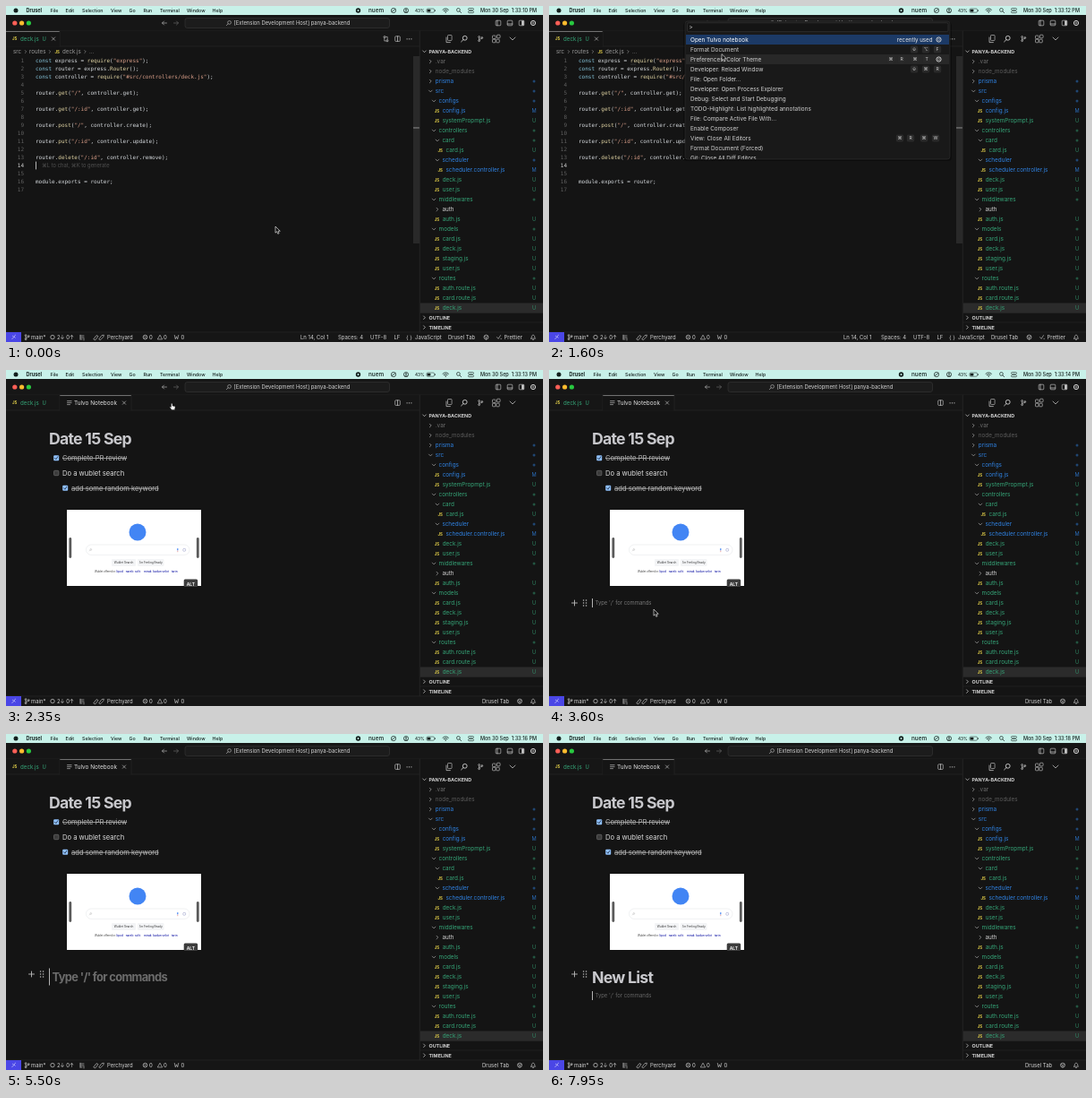
Write an HTML page that moves like this. It is 600x375 px and loops after 8000 ms.

```html
<!DOCTYPE html>
<html lang="en">
<head>
<meta charset="utf-8">
<title>Notebook in the editor</title>
<style>
html, body { margin: 0; width: 100%; height: 100%; overflow: hidden; background: #141414; }
svg { display: block; width: 100vw; height: 100vh; }
text { font-family: Inter, "DejaVu Sans", sans-serif; white-space: pre; }
.mono { font-family: "DejaVu Sans Mono", monospace; }
</style>
</head>
<body>
<svg id="stage" viewBox="0 0 600 375" xmlns="http://www.w3.org/2000/svg"></svg>
<script>
const LOOP = 8000;
const GREEN = '#35a578', BLUE = '#2f83e4', LIGHT = '#d2d2d2', DIM = '#6e6e6e', YELLOW = '#e6d24a';
const stage = document.getElementById('stage');

// y is the visual middle of the line
const text = (x, y, s, size = 6.35, fill = LIGHT, more = '') =>
  `<text x="${x}" y="${(y + size * .36).toFixed(2)}" font-size="${size}" fill="${fill}" ${more}>${s}</text>`;
const rect = (x, y, w, h, fill, more = '') =>
  `<rect x="${x}" y="${y}" width="${w}" height="${h}" fill="${fill}" ${more}/>`;
const dot = (x, y, r, fill, more = '') => `<circle cx="${x}" cy="${y}" r="${r}" fill="${fill}" ${more}/>`;
const line = (d, stroke = LIGHT, width = .7) =>
  `<path d="${d}" fill="none" stroke="${stroke}" stroke-width="${width}" stroke-linecap="round" stroke-linejoin="round"/>`;
const ring = (x, y, r, stroke = LIGHT, width = .7) => dot(x, y, r, 'none', `stroke="${stroke}" stroke-width="${width}"`);
const frame = (x, y, w, h, stroke = LIGHT, width = .6, r = .8) =>
  rect(x, y, w, h, 'none', `rx="${r}" stroke="${stroke}" stroke-width="${width}"`);
const chevron = (x, y, open, color = LIGHT, r = 1.8) => open
  ? line(`M${x - r} ${y - r / 2}l${r} ${r} ${r} ${-r}`, color)
  : line(`M${x - r / 2} ${y - r}l${r} ${r} ${-r} ${r}`, color);
const glass = (x, y, color = LIGHT, r = 1.9) =>
  ring(x + r * .3, y - r * .3, r, color, r * .37) + line(`M${x - r * .4} ${y + r * .4}l${-r} ${r}`, color, r * .37);
const cross = (x, y, color = LIGHT) => line(`M${x - 1.7} ${y - 1.7}l3.4 3.4m0 -3.4l-3.4 3.4`, color, .6);
const gear = (x, y, color = LIGHT) => ring(x, y, 2.6, color, 1) + ring(x, y, 1, color, .6);
const ellipsis = (x, y) => [-2.4, 0, 2.4].map(d => dot(x + d, y, .6, LIGHT)).join('');
const jsIcon = (x, y) => text(x, y, 'JS', 4.3, YELLOW, 'font-weight="700"');
const split = (x, y) => frame(x - 2.8, y - 2.8, 5.6, 5.6) + line(`M${x} ${y - 2.8}v5.6`);
const branch = (x, y) => ring(x - 1.4, y - 2, .9) + ring(x - 1.4, y + 2.2, .9) + ring(x + 1.8, y - 1, .9) +
  line(`M${x - 1.4} ${y - 1}v2.2m0 -.4q3 0 3.2 -1.6`, LIGHT, .6);
const group = (id, body) => `<g id="${id}">${body}</g>`;

function menuBar() {
  const ink = '#14201e', paper = '#c8f1e9', bold = 'font-weight="500"';
  const menus = [[49.5, 'File'], [66.5, 'Edit'], [85, 'Selection'], [117, 'View'], [137.5, 'Go'],
    [153.5, 'Run'], [172, 'Terminal'], [202, 'Window'], [230.5, 'Help']];
  return rect(0, 0, 600, 10, paper) + dot(11, 5, 2.5, ink) +
    text(22.5, 5, 'Drusel', 5.5, ink, 'font-weight="700"') +
    menus.map(([x, s]) => text(x, 5, s, 5.3, ink, bold)).join('') +
    dot(393.5, 5, 2.7, ink) + dot(393.5, 5, 1, paper) +
    text(405, 5, 'nuem', 6.4, ink, bold) +
    ring(433, 5, 2.6, ink) + line('M431 6.5l4 -3', ink) + ring(447, 5, 2.6, ink) + dot(447, 4.3, .9, ink) +
    line('M445.4 6.8q1.6 -1.6 3.2 0', ink) + text(457, 5, '43%', 4.6, ink, bold) +
    frame(470, 3, 8.5, 4.2, ink, .5, 1.2) + rect(470.7, 3.7, 3.6, 2.8, ink, 'rx=".6"') + rect(479, 4.3, .7, 1.6, ink) +
    line('M488 4.2q3.2 -2.8 6.4 0m-5.2 1.3q2 -1.6 4 0', ink, .8) + dot(491.2, 7, .7, ink) +
    `<g transform="translate(1011.5 0) scale(-1 1)">${glass(505.5, 5, ink)}</g>` +
    frame(516.5, 2.5, 6, 2, ink, .6, 1) + frame(516.5, 5.7, 6, 2, ink, .6, 1) +
    `<text id="clock" x="530" y="7" font-size="5.5" fill="${ink}" font-weight="500"></text>`;
}

function titleBar() {
  const lights = ['#ff5f57', '#febc2e', '#28c840'];
  return rect(0, 10, 600, 18, '#161616') + lights.map((c, i) => dot(9.8 + i * 7.8, 19, 2.6, c)).join('') +
    line('M179.5 19h-5m2 -2l-2 2 2 2', '#b0b0b0') + line('M187.5 19h5m-2 -2l2 2 -2 2', '#666') +
    rect(200, 13.5, 228.5, 11, '#1c1c1c', 'rx="2.5" stroke="#383838" stroke-width=".6"') + glass(249, 19, '#aaa') +
    text(254.5, 19, '[Extension Development Host] panya-backend', 5.9) +
    [550, 563, 576].map(x => frame(x - 2.8, 16.2, 5.6, 5.6)).join('') +
    line('M549 16.2v5.6') + line('M560.2 20h5.6') + rect(576.2, 16.4, 2.4, 5.2, LIGHT) + gear(589, 19) +
    line('M0 28H600', '#292929', .6);
}

function sidebar() {
  // depth, kind (> closed, v open, j script), name, colour, mark
  const rows = [
    [0, '>', '.var', DIM], [0, '>', 'node_modules', '#5c5c5c'], [0, '>', 'prisma', BLUE, 'o'], [0, 'v', 'src', BLUE, 'o'],
    [1, 'v', 'configs', BLUE, 'o'], [1, 'j', 'config.js', BLUE, 'M'], [1, 'j', 'systemPropmpt.js', GREEN, 'U'],
    [1, 'v', 'controllers', GREEN, 'o'], [2, 'v', 'card', GREEN, 'o'], [2, 'j', 'card.js', GREEN, 'U'],
    [2, 'v', 'scheduler', BLUE, 'o'], [2, 'j', 'scheduler.controller.js', BLUE, 'M'],
    [1, 'j', 'deck.js', GREEN, 'U'], [1, 'j', 'user.js', GREEN, 'U'], [1, 'v', 'middlewares', GREEN, 'o'],
    [2, '>', 'auth', LIGHT], [1, 'j', 'auth.js', GREEN, 'U'], [1, 'v', 'models', GREEN, 'o'],
    [1, 'j', 'card.js', GREEN, 'U'], [1, 'j', 'deck.js', GREEN, 'U'], [1, 'j', 'staging.js', GREEN, 'U'],
    [1, 'j', 'user.js', GREEN, 'U'], [1, 'v', 'routes', GREEN, 'o'], [1, 'j', 'auth.route.js', GREEN, 'U'],
    [1, 'j', 'card.route.js', GREEN, 'U'], [1, 'j', 'deck.js', GREEN, 'U']];
  const row = ([depth, kind, name, color, mark], i) => {
    const y = 62 + i * 11, x = 474.3 + depth * 3.8, js = kind === 'j';
    const sign = mark === 'o' ? dot(590, y, 1.5, color, 'opacity=".45"')
      : mark ? text(590, y, mark, 5.7, color, 'text-anchor="middle" opacity=".8"') : '';
    return (js ? jsIcon(x + .7, y + .3) : chevron(x, y, kind === 'v', '#aaa')) +
      text(x + (js ? 9.6 : 5.5), y, name, 6.35, color) + sign;
  };
  const section = (y, s, open) => chevron(467.5, y, open) + text(472.5, y, s, 5.4, LIGHT, 'font-weight="700"');
  return rect(462, 28, 138, 336, '#141414') + line('M462.3 28V364', '#2b2b2b', .7) +
    frame(493.5, 32.5, 4.6, 6) + line('M492 35v5.6h4.4') + glass(512, 36.5, LIGHT, 2.4) + branch(530, 36.5) +
    [[543.5, 33], [543.5, 37.2], [547.7, 37.2], [548.5, 32.2]].map(([x, y]) => frame(x, y, 3.6, 3.6)).join('') +
    chevron(566, 36.5, true, LIGHT, 3) + section(50.8, 'PANYA-BACKEND', true) +
    rect(463, 331.5, 137, 11, '#2b2b2b') + rows.map(row).join('') +
    line('M463 342.5H600M463 353H600', '#2b2b2b', .5) + section(347.8, 'OUTLINE') + section(358.6, 'TIMELINE');
}

function statusBar() {
  const y = 369.6, s = 5.95;
  const put = (x, label) => text(x, y, label, s);
  const cube = x => ring(x, y, 2.4) + line(`M${x - 2} ${y - 1}l2 1.2 2 -1.2m-2 1.2v2.4`, LIGHT, .5);
  const bell = line(`M586.5 ${y + 1.6}h5l-.8 -1.2v-1.6q-1.7 -3 -3.4 0v1.6zm2 1.3h1`, LIGHT, .6);
  return rect(0, 364, 600, 11, '#161616') + line('M0 364H600', '#2b2b2b', .6) + rect(0, 364, 17, 11, '#4a46e6') +
    line(`M6.8 ${y + 2}l2 -2 -1.4 -1.4M10.6 ${y - 2.4}l-1.8 1.6 1.4 1.4`, '#e8e8ff', .6) +
    branch(23.5, y) + put(28, 'main*') + ring(52, y, 2.2) + put(57, '2↓ 0↑') +
    line(`M83 ${y - 2.4}v4.8m0 -4h4m-4 2h4m-4 2h2m2 -1v2`, LIGHT, .6) +
    line(`M98 ${y + 2}l3 -4 2 1 -3 4zM104 ${y + 2}l3 -4 2.4 -.4 -.6 2.2 -3 3z`, LIGHT, .6) + put(113, 'Perchyard') +
    ring(155.5, y, 2.3) + line(`M154.6 ${y - .9}l1.8 1.8m0 -1.8l-1.8 1.8`, LIGHT, .5) + put(160, '0') +
    line(`M169.5 ${y + 2}l2.5 -4.4 2.5 4.4z`, LIGHT, .6) + put(176, '0') +
    line(`M188.3 ${y - 2.2}l1 4.4 1.2 -3 1.2 3 1 -4.4`, LIGHT, .6) + put(195.5, '0') +
    group('codeStatus', put(329, 'Ln 14, Col 1') + put(371, 'Spaces: 4') + put(407, 'UTF-8') + put(433.5, 'LF') +
      put(447, '{ }') + put(457, 'JavaScript') + put(494, 'Drusel Tab') + cube(536.5) +
      line(`M548.5 ${y}l1.6 1.8 2.4 -3.8m1 3.8l-.6 0`, LIGHT, .6) + put(556.5, 'Prettier')) +
    group('noteStatus', put(532, 'Drusel Tab') + cube(574)) + bell;
}

function codeView() {
  const source = ['const express = require("express");', 'const router = express.Router();',
    'const controller = require("#src/controllers/deck.js");', '', 'router.get("/", controller.get);', '',
    'router.get("/:id", controller.get);', '', 'router.post("/", controller.create);', '',
    'router.put("/:id", controller.update);', '', 'router.delete("/:id", controller.remove);', '', '',
    'module.exports = router;', ''];
  const paint = (s, c) => `<tspan fill="${c}">${s}</tspan>`;
  const color = s => s.replace(/"[^"]*"|\bconst\b|\w+(?=\()/g,
    m => paint(m, m[0] === '"' ? '#dca08a' : m === 'const' ? '#86c5dc' : '#e3d6a5'));
  const y = i => 61 + i * 9;
  return rect(0, 45, 462, 319, '#141414') +
    text(8, 51, 'src', 6.2, '#999') + chevron(22, 51, false, '#888', 1.5) + text(26, 51, 'routes', 6.2, '#999') +
    chevron(49, 51, false, '#888', 1.5) + jsIcon(54.5, 51.3) + text(63, 51, 'deck.js', 6.2, '#999') +
    chevron(88.5, 51, false, '#888', 1.5) + text(93, 51, '...', 6.2, '#999') +
    source.map((s, i) => text(20, y(i), i + 1, 6, i === 13 ? LIGHT : '#606060', 'class="mono" text-anchor="end"') +
      text(33, y(i), color(s), 6, '#d8dce0', 'class="mono"')).join('') +
    [92, 94, 96].map(x => dot(x, 65, .4, '#999')).join('') +
    rect(455, 56, 7, 209, '#292929') + rect(455, 135.3, 7, 1.3, '#777') +
    group('ghost', text(40, 178, '⌘L to chat, ⌘K to generate', 5.8, '#505050') +
      rect(33, 173.6, .8, 8.8, '#ddd', 'id="codeCaret"'));
}

function tabs() {
  const active = (x, w) => rect(x, 28, w, 17.4, '#151515') + rect(x, 28, w, .7, '#9a9a9a');
  return rect(0, 28, 462, 17, '#161616') + line('M0 45H462M60 28V45', '#2a2a2a', .6) +
    group('codeTab', active(0, 59.7) + cross(53, 36.6) + ring(423, 34.6, 1) + ring(426, 38.8, 1) +
      line('M422.8 36v3h1.6M426.2 37.4v-3h-1.6', LIGHT, .6)) +
    jsIcon(7, 36.8) + text(16, 36.6, 'deck.js', 6.2, GREEN) + text(40.5, 36.6, 'U', 5.8, GREEN) +
    group('noteTab', active(60.3, 79.7) + line('M140 28V45', '#2a2a2a', .6) +
      line('M68.5 34.6h4.6m-4.6 2h4.6m-4.6 2h3', LIGHT, .6) + text(76, 36.6, 'Tulvo Notebook', 6.45, '#e0e0e0') +
      cross(132, 36.6)) + split(437.5, 36.6) + ellipsis(450.5, 36.8);
}

function picture() {
  const ink = '#333', tongues = ['lipod', 'nareb', 'solti', 'mirak', 'kadun', 'velot', 'tarin'];
  const handle = x => rect(x, 187, 2.8, 23, '#5a5a5a', 'rx="1.4"');
  return rect(68, 156, 150, 85, '#fff') + dot(147, 181, 9.5, '#4285f4') +
    frame(89.5, 195, 115.5, 11.4, '#e6e7ea', .6, 5.7) + glass(94.5, 200.7, '#999', .9) +
    rect(191.2, 199, 1.2, 2.4, '#4285f4', 'rx=".6"') + line('M191.8 202v.8', '#d9534a', .5) +
    frame(197.8, 199.4, 2.8, 2.8, '#8a8fc0', .5) +
    rect(118, 211, 27, 8, '#f3f4f6', 'rx="1"') + rect(147, 211, 29.5, 8, '#f3f4f6', 'rx="1"') +
    text(131.5, 215, 'Wublet Search', 3.1, ink, 'text-anchor="middle"') +
    text(161.7, 215, "I'm Feeling Ready", 3.1, ink, 'text-anchor="middle"') +
    text(99, 225.3, 'Wublet offered in:', 2.8, ink) +
    tongues.map((s, i) => text(123.5 + i * 10.2, 225.3, s, 3.2, '#1a1fa8', 'font-weight="500"')).join('') +
    handle(70.4) + handle(212.9) + rect(198.7, 233.5, 15.5, 8.5, '#3c3c3c', 'rx="1.5"') +
    text(206.4, 239, 'ALT', 5, '#fff', 'font-weight="600" text-anchor="middle"');
}

function noteView() {
  const box = (x, y, on) => on
    ? rect(x, y, 6, 6, '#8fc0fb', 'rx="1"') + line(`M${x + 1.4} ${y + 3.1}l1.3 1.4 2 -3`, '#26364a', .9)
    : rect(x + .3, y + .3, 5.4, 5.4, '#3c3c3c', 'rx="1" stroke="#777" stroke-width=".6"');
  const struck = 'text-decoration="line-through"', done = '#b8b8b8';
  return rect(0, 45.3, 462, 318.7, '#141414') +
    text(48, 76.3, 'Date 15 Sep', 17.7, '#c8c8cc', 'font-weight="700" letter-spacing="-.75"') +
    box(53.2, 95.2, true) + text(63, 98, 'Complete PR review', 7.6, done, struck) +
    box(53.2, 112, false) + text(63, 115, 'Do a wublet search', 7.6, '#dcdcdc') +
    box(63.2, 128.7, true) + text(73, 131.8, 'add some random keyword', 7.6, done, struck) + picture() +
    group('handles', line('M25.5 0h6m-3 -3v6', '#bbb', .9) +
      [-3, 0, 3].map(y => dot(38.6, y, .8, '#bbb') + dot(41.6, y, .8, '#bbb')).join('')) +
    group('hint', text(51.5, 260, "Type '/' for commands", 5.9, '#777')) +
    group('bigHint', text(51.5, 271.3, "Type '/' for commands", 12.9, '#6c6c6c', 'font-weight="700" letter-spacing="-.65"')) +
    group('lastHint', text(51.5, 292, "Type '/' for commands", 5.9, '#666')) +
    text(48, 260, '', 7.6, '#d0d0d0', 'id="query"') +
    text(48, 271.3, '', 17.7, '#c8c8cc', 'id="heading" font-weight="700" letter-spacing="-.75"') +
    rect(48, 255, .8, 10, '#ddd', 'id="caret"');
}

function slashMenu(names) {
  const info = { Text: 'Start writing plain text.', Table: 'Add simple table', Divider: 'Divide your blocks',
    'Heading 1': 'Big section heading', 'Heading 2': 'Medium section heading', 'Heading 3': 'Small section heading' };
  const height = names.length * 25 + 8, top = 250 - height;
  const icon = (name, y) => name === 'Table'
    ? frame(58, y - 4.5, 9, 9, LIGHT, .7) + line(`M58 ${y - 1.5}h9m-9 3h9m-4.5 -6v9`, LIGHT, .6)
    : name === 'Divider' ? line(`M60 ${y}h5`)
    : name === 'Text' ? text(57.5, y, 'A<tspan font-size="5.5">A</tspan>', 8, '#c0c0c0')
    : text(57, y, `H<tspan font-size="6">${name.slice(-1)}</tspan>`, 8.5, '#c0c0c0');
  return rect(48, top, 135, height, '#191919', 'rx="4" stroke="#c4c4c4" stroke-width=".7"') +
    rect(50.5, top + 3.5, 130, 24.5, '#282828', 'rx="2.5"') + names.map((name, i) => {
      const y = top + 16 + i * 25;
      return rect(52.5, y - 10.2, 20, 20.4, '#222', 'rx="3" stroke="#808080" stroke-width=".6"') + icon(name, y) +
        text(76.8, y - 4, name, 6.8, '#e0e0e0', 'font-weight="600"') + text(76.8, y + 5.3, info[name], 5.95, '#c0c0c0');
    }).join('');
}

function palette() {
  const keys = { 1: [[408, '⇧'], [421, '⌥'], [434, 'F']], 2: [[382, '⌘'], [394, 'R'], [409, '⌘'], [422, 'T']],
    3: [[408, '⇧'], [421, '⌘'], [434, 'R']], 10: [[392, '⌘'], [404, 'R'], [419, '⌘'], [432, 'W']] };
  const commands = ['Open Tulvo notebook', 'Format Document', 'Preferences: Color Theme', 'Developer: Reload Window',
    'File: Open Folder...', 'Developer: Open Process Explorer', 'Debug: Select and Start Debugging',
    'TODO-Highlight: List highlighted annotations', 'File: Compare Active File With...', 'Enable Composer',
    'View: Close All Editors', 'Format Document (Forced)', 'Git: Close All Diff Editors'];
  const badge = ([x, s], y) => rect(x - 4.2, y - 4, 8.4, 8, '#2a2a2a', 'rx="1.5"') +
    text(x, y, s, 5, LIGHT, 'text-anchor="middle"');
  return `<clipPath id="list"><rect x="152" y="17" width="296" height="154"/></clipPath>` +
    rect(150, 18, 300, 155, '#000', 'rx="4" opacity=".35"') +
    rect(152, 17, 296, 154, '#191919', 'rx="3" stroke="#303030" stroke-width=".6"') +
    rect(154.5, 18.8, 291.5, 9.8, '#141414', 'rx="1.5" stroke="#3a3a3a" stroke-width=".6"') + text(156.5, 23.8, '&gt;', 6.3) +
    `<g clip-path="url(#list)">` + rect(153, 32, 294, 11, '#1c3a66') +
    group('hover', rect(153, 0, 294, 11, '#282828') + gear(435.5, 5.5)) +
    commands.map((s, i) => text(158, 37.5 + i * 11, s, 6.4, i ? LIGHT : '#fff') +
      (keys[i] || []).map(k => badge(k, 37.5 + i * 11)).join('')).join('') +
    text(428.5, 37.5, 'recently used', 6.2, '#e8e8e8', 'text-anchor="end"') + gear(435.5, 37.5) + '</g>';
}

const pointers =
  group('arrow', '<path d="M0 0v7.2l1.7 -1.5 1.1 2.6 1.3 -.6 -1.1 -2.5h2.3z" fill="#111" stroke="#fff" stroke-width=".6"/>') +
  group('hand', '<path d="M-.8 0q.8 -.9 1.5 0v2.2l2.5 .6q.7 .3 .5 1.4l-.6 2.4h-3.3l-2.1 -2.8q.3 -1.2 1.5 -.2z" fill="#fff" stroke="#222" stroke-width=".5"/>');

const HEADINGS = ['Heading 1', 'Heading 2', 'Heading 3'];
stage.innerHTML = titleBar() + group('code', codeView()) + group('note', noteView()) + tabs() + sidebar() + statusBar() +
  group('fullMenu', slashMenu(['Text', 'Table', 'Divider', ...HEADINGS])) + group('headMenu', slashMenu(HEADINGS)) +
  group('palette', palette()) + menuBar() + pointers;

const $ = id => document.getElementById(id);
const show = (id, on) => $(id).setAttribute('visibility', on ? 'visible' : 'hidden');
const move = (id, x, y) => $(id).setAttribute('transform', `translate(${x} ${y})`);

const AT = { palette: 750, note: 2000, focus: 3300, slash: 3900, filter: 4650, heading: 5500, list: 7750 };
const KEYS = [[3300, ''], [3900, '/'], [4150, '/h'], [4400, '/he'], [4650, '/hea'], [4850, '/head']];
const TITLE = [[5500, ''], [6550, 'N'], [6750, 'Ne'], [6950, 'New'], [7100, 'New '], [7200, 'New L'],
  [7350, 'New Li'], [7450, 'New Lis'], [7600, 'New List']];
const PATH = [[0, 301, 246], [850, 301, 246], [1500, 193, 53.6], [1650, 193, 53.6], [1850, 189, 38],
  [2050, 189, 38], [2300, 185.3, 37.8], [2450, 185.3, 37.8], [3150, 117, 267], [8000, 117, 267]];

const latest = (steps, t) => steps.filter(s => s[0] <= t).pop() || steps[0];
function along(path, t) {
  const i = path.findIndex((p, n) => n && t <= p[0]), a = path[i - 1], b = path[i];
  const u = (t - a[0]) / (b[0] - a[0]), e = u * u * (3 - 2 * u);
  return [a[1] + (b[1] - a[1]) * e, a[2] + (b[2] - a[2]) * e];
}

function render(t) {
  const note = t >= AT.note, pal = t >= AT.palette && !note;
  const isHeading = t >= AT.heading, isList = t >= AT.list;
  $('clock').textContent = `Mon 30 Sep  1:33:${10 + Math.floor((t + 800) / 1000)} PM`;
  for (const id of ['code', 'codeTab', 'codeStatus']) $(id).style.display = note ? 'none' : '';
  for (const id of ['note', 'noteTab', 'noteStatus']) $(id).style.display = note ? '' : 'none';
  $('ghost').style.display = t < AT.palette ? '' : 'none';
  show('codeCaret', t % 1000 < 500);

  const [x, y] = along(PATH, t), onTabs = note && y < 45;
  show('arrow', t < AT.slash && !onTabs);
  show('hand', t < AT.slash && onTabs);
  move('arrow', x, y);
  move('hand', x, y);

  $('palette').style.display = pal ? '' : 'none';
  const row = Math.floor((y - 31.5) / 11);
  $('hover').style.display = row > 0 && row < 13 ? '' : 'none';
  move('hover', 0, 32 + row * 11);

  const [keyTime, query] = latest(KEYS, t), [titleTime, title] = latest(TITLE, t);
  $('query').textContent = isHeading ? '' : query;
  $('heading').textContent = isHeading ? title : '';
  show('handles', isHeading || t >= AT.focus && t < AT.slash);
  move('handles', 0, isHeading ? 268 : 260);
  show('hint', t >= AT.focus && t < AT.slash);
  show('bigHint', isHeading && !title);
  show('lastHint', isList);
  show('fullMenu', t >= AT.slash && t < AT.filter);
  show('headMenu', t >= AT.filter && !isHeading);

  const last = isList ? AT.list : isHeading ? titleTime : keyTime;
  const typed = isList ? 0 : $(isHeading ? 'heading' : 'query').getComputedTextLength();
  const [top, height] = isList ? [287, 10] : isHeading ? [261.5, 19] : [255, 10];
  const caret = $('caret');
  caret.setAttribute('x', 48 + typed);
  caret.setAttribute('y', top);
  caret.setAttribute('height', height);
  show('caret', t >= AT.focus && (t - last) % 1000 < 500);
}

const start = performance.now();
function tick() {
  render((performance.now() - start) % LOOP);
  requestAnimationFrame(tick);
}
tick();
</script>
</body>
</html>
```
